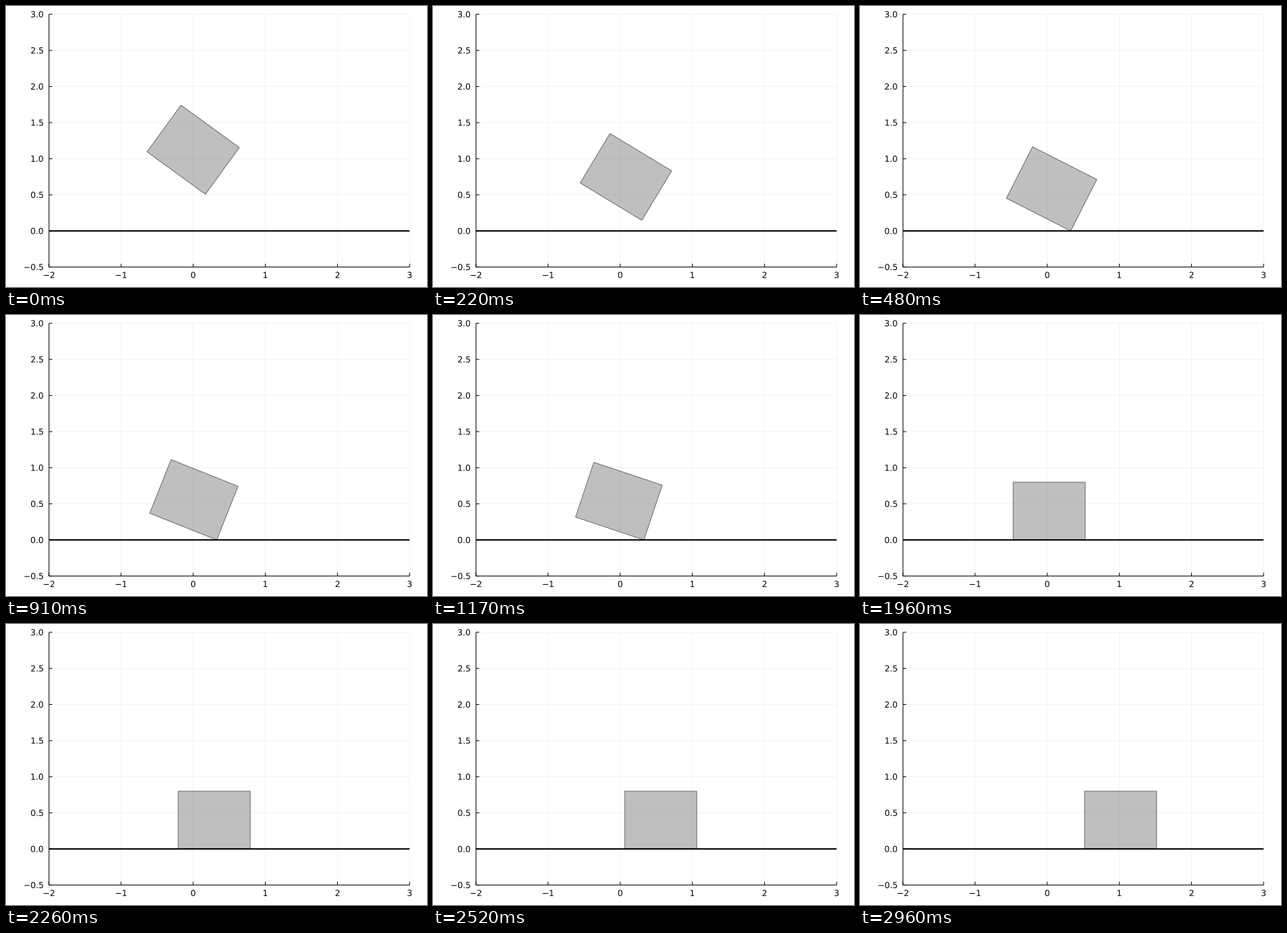
Write a matplotlib script that moves like this. It is 600 px wide and 400 px high and loops after 3010 ms.

```python
import numpy as np
import matplotlib.pyplot as plt
from matplotlib.animation import FuncAnimation
from matplotlib.patches import PathPatch
from matplotlib.textpath import TextPath
from matplotlib.transforms import Affine2D

W, H, DPI = 600, 400, 100
LOOP, TICK = 3010, 10          # ms
FPS, STEPS = 23, 69
BOX_W, BOX_H = 1.0, 0.8
LAND, RELEASE, SLIDE = 6, 36, 44

# plot area in pixels, y downwards
LEFT, TOP, BOTTOM = 61.2, 11.811, 371.61
UNIT = (BOTTOM - TOP) / 3.5
RIGHT = LEFT + 5 * UNIT


def px(x):
    return LEFT + (x + 2) * UNIT


def py(y):
    return TOP + (3 - y) * UNIT


def pt(pixels):
    return pixels * 72 / DPI


def pose(k):
    """Lower right corner (x, y) and clockwise tilt in radians at step k."""
    if k <= LAND:
        # free fall with constant drift and spin
        a = np.radians(36 - 5.8 * k / LAND)
        cx = 0.095 * k / LAND
        cy = 1.125 - 0.0251 * k * (k + 1) / 2
        x = cx + BOX_W / 2 * np.cos(a) - BOX_H / 2 * np.sin(a)
        y = cy - BOX_W / 2 * np.sin(a) - BOX_H / 2 * np.cos(a)
        return x, max(y, 0), a
    if k <= RELEASE:
        # slow roll about the resting corner
        a = np.interp(k, [7, 11, 21, 34], [30.2, 26.9, 21.7, 14.7])
        x = np.interp(k, [21, 34], [0.326, 0.333])
        return x, 0, np.radians(a)
    if k <= SLIDE:
        # tips over and settles flat
        n = min(k - RELEASE, 5)
        s = n * (n + 1) / 2
        return 0.333 + 0.185 * s / 15, 0, np.radians(max(14.7 - 1.4 * s, 0))
    # pushed along the floor, quickly reaching full speed
    m, tau = k - SLIDE, 2.05
    return 0.518 + 0.0455 * (m - tau * (1 - np.exp(-m / tau))), 0, 0.0


def corners(k):
    x, y, a = pose(k)
    p = np.array([x, y])
    left = BOX_W * np.array([-np.cos(a), np.sin(a)])
    up = BOX_H * np.array([np.sin(a), np.cos(a)])
    pts = np.array([p, p + up, p + up + left, p + left])
    return np.column_stack([px(pts[:, 0]), py(pts[:, 1])])


fig = plt.figure(figsize=(W / DPI, H / DPI), dpi=DPI, facecolor="white")
ax = fig.add_axes([0, 0, 1, 1])
ax.set(xlim=(0, W), ylim=(H, 0))
ax.axis("off")


def line(x0, y0, x1, y1, width=1.0, alpha=1.0, z=3):
    ax.plot([x0, x1], [y0, y1], color="black", linewidth=pt(width),
            alpha=alpha, zorder=z, solid_capstyle="butt", snap=False)


def label(s, x, baseline, align):
    """Outlined text; align is the share of its width left of x."""
    path = TextPath((0, 0), s.replace("-", "\u2212"), size=11.85)
    box = path.get_extents()
    shift = Affine2D().scale(1, -1).translate(
        x - box.x0 - align * box.width, baseline)
    ax.add_patch(PathPatch(shift.transform_path(path), facecolor="black",
                           linewidth=0, snap=False))


for v in range(-2, 4):
    x = px(v)
    line(x, TOP, x, BOTTOM, 0.5, 0.1, 1)
    line(x, BOTTOM, x, BOTTOM - 4.72)
    label(f"{v}", x, 387.2, 0.5)
for v in np.arange(-0.5, 3.01, 0.5):
    y = py(v)
    line(LEFT, y, RIGHT, y, 0.5, 0.1, 1)
    line(LEFT, y, LEFT + 4.72, y)
    label(f"{v:.1f}", 52.8, y + 4.32, 1)
line(LEFT, TOP, LEFT, BOTTOM)
line(LEFT, BOTTOM, RIGHT, BOTTOM)
line(LEFT, py(0), RIGHT, py(0), 2)

box = plt.Polygon(corners(0), closed=True, facecolor=(0.5, 0.5, 0.5, 0.5),
                  edgecolor=(0, 0, 0, 0.5), linewidth=pt(1),
                  joinstyle="round", snap=False, zorder=2)
ax.add_patch(box)


def update(i):
    k = int((i * TICK + TICK / 2) * FPS / 1000)
    box.set_xy(corners(min(k, STEPS - 1)))
    return (box,)


anim = FuncAnimation(fig, update, frames=LOOP // TICK, interval=TICK,
                     repeat=True, repeat_delay=0, blit=False)
plt.show()
```
